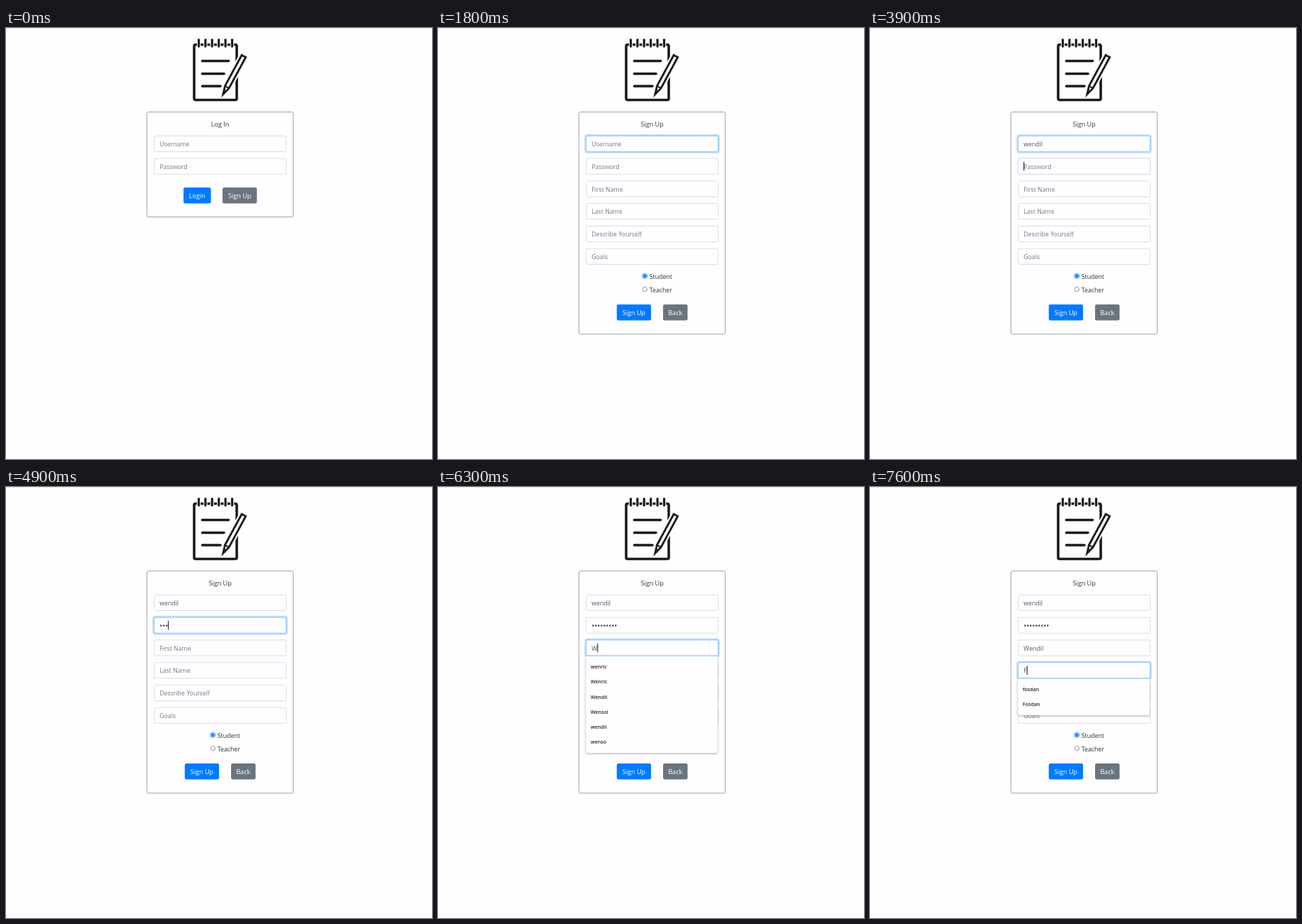
These frames come from a looping animation (600x608 px, 8 s). An HTML page with a canvas:

```html
<!DOCTYPE html>
<html lang="en">
<head>
<meta charset="utf-8">
<title>Sign up form</title>
<style>
  html, body { margin: 0; width: 100%; height: 100%; overflow: hidden; background: #fefdff; }
  canvas { display: block; width: 600px; height: 608px; }
</style>
</head>
<body>
<canvas id="stage"></canvas>
<script>
const W = 600, H = 608, LOOP = 8000, STEP = 100;
const PAPER = '#fefdff', INK = '#1b1b1e', BLUE = [0, 123, 255];
const FONT = '"Open Sans", "Noto Sans", sans-serif';
const SIGNUP_AT = 1300;

const canvas = document.getElementById('stage');
const ctx = canvas.getContext('2d');
const dpr = window.devicePixelRatio || 1;
canvas.width = W * dpr;
canvas.height = H * dpr;

// Each field: focus span and [time, value] entries.
const fields = [
  { label: 'Username', focus: [1300, 3900],
    keys: [[2800, 'w'], [3000, 'we'], [3200, 'wen'], [3400, 'wendil'], [3600, 'wendil']] },
  { label: 'Password', focus: [3900, 5900], secret: true,
    keys: [[4700, 1], [4800, 2], [4900, 3], [5100, 5], [5200, 6], [5500, 8], [5600, 9]] },
  { label: 'First Name', focus: [5900, 7000],
    keys: [[6300, 'W'], [6500, 'We'], [6700, 'wenric'], [6800, 'Wenric'], [6900, 'Wendil']] },
  { label: 'Last Name', focus: [7000, Infinity], keys: [[7500, 'F']] },
  { label: 'Describe Yourself' },
  { label: 'Goals' }
];
fields.forEach((f, i) => f.y = 152 + i * 31.8);

// Suggestion lists: picks are [time, highlighted row].
const lists = [
  { field: 0, from: 1900, to: 2900,
    rows: ['wenric', 'wendil', 'Wenric', 'wensol', 'wenric48', 'wenricolt48'] },
  { field: 0, from: 2900, to: 3100,
    rows: ['wendil', 'wenric', 'wensol', 'Wenric', 'wenric48', 'wenricolt48'] },
  { field: 0, from: 3100, to: 3600, picks: [[3400, 0]],
    rows: ['wendil', 'wensol', 'Wenric', 'wenric', 'wenric48', 'wenricolt48'] },
  { field: 2, from: 6300, to: 7000, picks: [[6700, 0], [6800, 1], [6900, 2]],
    rows: ['wenric', 'Wenric', 'Wendil', 'Wensol', 'wendil', 'wenso'] },
  { field: 3, from: 7600, to: LOOP, rows: ['fosdan', 'Fosdan'] }
];

const rgb = c => `rgb(${c.map(Math.round)})`;
const mix = (a, b, k) => a.map((v, i) => v + (b[i] - v) * k);
const latest = (events, t) => (events || []).filter(e => e[0] <= t).pop();

function fade(t, start) {
  const k = Math.min(1, Math.max(0, (t - start + 50) / 250));
  return t < start ? 0 : k * k * (3 - 2 * k);
}

function box(x, y, w, h, r, fill, stroke) {
  ctx.beginPath();
  ctx.roundRect(x, y, w, h, r);
  if (fill) { ctx.fillStyle = fill; ctx.fill(); }
  if (stroke) { ctx.strokeStyle = stroke; ctx.lineWidth = 0.9; ctx.stroke(); }
}

function text(s, x, y, size, color, align = 'left', weight = 400) {
  ctx.font = `${weight} ${size}px ${FONT}`;
  ctx.fillStyle = color;
  ctx.textAlign = align;
  ctx.fillText(s, x, y);
  return ctx.measureText(s).width;
}

function line(x1, y1, x2, y2, width) {
  ctx.lineWidth = width;
  ctx.beginPath();
  ctx.moveTo(x1, y1);
  ctx.lineTo(x2, y2);
  ctx.stroke();
}

function drawNotepad() {
  ctx.strokeStyle = INK;
  ctx.lineCap = 'round';
  ctx.lineJoin = 'round';
  ctx.lineWidth = 3.6;
  ctx.beginPath();
  ctx.roundRect(265, 23.5, 60, 78, 2);
  ctx.stroke();
  for (let i = 0; i < 6; i++) {
    const x = 271.5 + i * 9.4;
    ctx.strokeStyle = PAPER;
    line(x, 18, x, 25, 5.4);
    ctx.strokeStyle = INK;
    line(x, 16.6, x, 26, 3.2);
  }
  line(276.5, 46.5, 313.5, 46.5, 3.5);
  line(276.5, 64.5, 307, 64.5, 3.5);
  line(276.5, 82, 302, 82, 3.5);
  drawPencil();
}

function drawPencil() {
  ctx.save();
  ctx.translate(335.5, 38.5);
  ctx.rotate(Math.atan2(30.5, 56.5));
  const outline = new Path2D('M-3.2 1.4H3.2V51L0 62.5L-3.2 51Z');
  ctx.fillStyle = PAPER;
  ctx.strokeStyle = PAPER;
  ctx.lineWidth = 7;
  ctx.stroke(outline);
  ctx.fill(outline);
  ctx.strokeStyle = INK;
  ctx.lineJoin = 'miter';
  ctx.lineWidth = 2.8;
  ctx.stroke(outline);
  line(-3, 51, 3, 51, 2);
  ctx.fillStyle = INK;
  ctx.fill(new Path2D('M-2.4 56H2.4L0 64Z'));
  ctx.restore();
}

function drawCard(title, bottom) {
  box(198.6, 118.5, 206, bottom - 118.5, 2, null, '#98989b');
  text(title, 301.6, 139, 9.1, '#34383c', 'center');
}

function drawButton(label, x, y, w, color) {
  box(x, y, w, 22.6, 2.4, color);
  text(label, x + w / 2, y + 15, 9.1, '#fff', 'center');
}

function drawField(f, t) {
  const [start, end] = f.focus || [Infinity, Infinity];
  const glow = fade(t, start) * (1 - fade(t, end));
  if (glow > 0) box(206.3, f.y - 2, 190.6, 26.7, 4, `rgba(0,123,255,${0.25 * glow})`);
  box(208.7, f.y + 0.2, 185.9, 22.2, 2.4, PAPER, rgb(mix([216, 220, 226], [128, 189, 255], glow)));

  const key = latest(f.keys, t);
  let caretX = 216.3;
  if (!key) {
    text(f.label, 216.2, f.y + 15, 8.75, '#757c84');
  } else if (f.secret) {
    ctx.fillStyle = '#3c4248';
    for (let i = 0; i < key[1]; i++) {
      ctx.beginPath();
      ctx.arc(218.3 + i * 4, f.y + 11.8, 1.25, 0, 7);
      ctx.fill();
    }
    caretX = 216.2 + key[1] * 4;
  } else {
    caretX = 216.2 + text(key[1], 216.2, f.y + 15, 8.75, '#555c63');
  }

  const since = t - Math.max(start, key ? key[0] : 0);
  if (t >= start && t < end && since % 1000 < 500) {
    ctx.fillStyle = '#111';
    ctx.fillRect(caretX, f.y + 5, 1, 12.6);
  }
}

function drawList(list, t) {
  const y = fields[list.field].y + 23.2, pitch = 21.25;
  ctx.save();
  ctx.shadowColor = 'rgba(0,0,0,0.35)';
  ctx.shadowBlur = 3 * dpr;
  ctx.shadowOffsetY = dpr;
  box(208.2, y, 185.6, list.rows.length * pitch + 9, [0, 0, 2, 2], PAPER);
  ctx.restore();
  const pick = latest(list.picks, t);
  list.rows.forEach((row, i) => {
    const mid = y + 14.9 + i * pitch;
    if (pick && pick[1] === i) {
      ctx.fillStyle = '#e9e8eb';
      ctx.fillRect(208.2, mid - pitch / 2, 185.6, pitch);
    }
    text(row, 215, mid + 2.4, 7.05, '#27272a', 'left', 600);
  });
}

function drawRadio(label, y, on) {
  ctx.beginPath();
  ctx.arc(291.3, y, 3.3, 0, 7);
  ctx.lineWidth = on ? 1 : 0.7;
  ctx.strokeStyle = on ? '#0075ff' : '#707074';
  ctx.stroke();
  if (on) {
    ctx.beginPath();
    ctx.arc(291.3, y, 2.1, 0, 7);
    ctx.fillStyle = '#0075ff';
    ctx.fill();
  }
  text(label, 297.8, y + 4, 8.75, '#303438');
}

function drawLogin(t) {
  drawCard('Log In', 266.6);
  fields.slice(0, 2).forEach(f => drawField(f, t));
  drawButton('Login', 250, 225, 38.6, rgb(BLUE));
  const ring = fade(t, 900);
  if (ring > 0) box(303.2, 223.2, 52.2, 26.2, 4, `rgba(130,138,145,${0.5 * ring})`);
  drawButton('Sign Up', 305, 225, 48.4, rgb(mix([108, 117, 125], [90, 98, 104], fade(t, 700))));
  if (ring > 0) box(305.4, 225.4, 47.6, 21.8, 2.2, null, `rgba(84,91,98,${ring})`);
}

function drawSignup(t) {
  drawCard('Sign Up', 431.9);
  fields.forEach(f => drawField(f, t));
  drawRadio('Student', 349.8, true);
  drawRadio('Teacher', 368.7, false);
  drawButton('Sign Up', 251.8, 390, 48.3, rgb(BLUE));
  drawButton('Back', 317, 390, 34.5, '#6c757d');
  lists.filter(l => t >= l.from && t < l.to).forEach(l => drawList(l, t));
}

function drawStatus() {
  box(-2, 596.4, 89, 14, [0, 2.5, 0, 0], '#dee0e5', '#cfd1d6');
  text('newclassroom.net/signup', 2, 605.2, 6.65, '#5c5f64');
}

function draw(t) {
  ctx.setTransform(dpr, 0, 0, dpr, 0, 0);
  ctx.fillStyle = PAPER;
  ctx.fillRect(0, 0, W, H);
  ctx.fillStyle = '#ebeaed';
  ctx.fillRect(0, 0, W, 1);
  drawNotepad();
  if (t < SIGNUP_AT) drawLogin(t); else drawSignup(t);
  if (t >= 800 && t < 1600) drawStatus();
}

const began = performance.now();
function tick() {
  const t = (performance.now() - began) % LOOP;
  draw(Math.floor(t / STEP) * STEP);
  requestAnimationFrame(tick);
}
tick();
</script>
</body>
</html>
```
